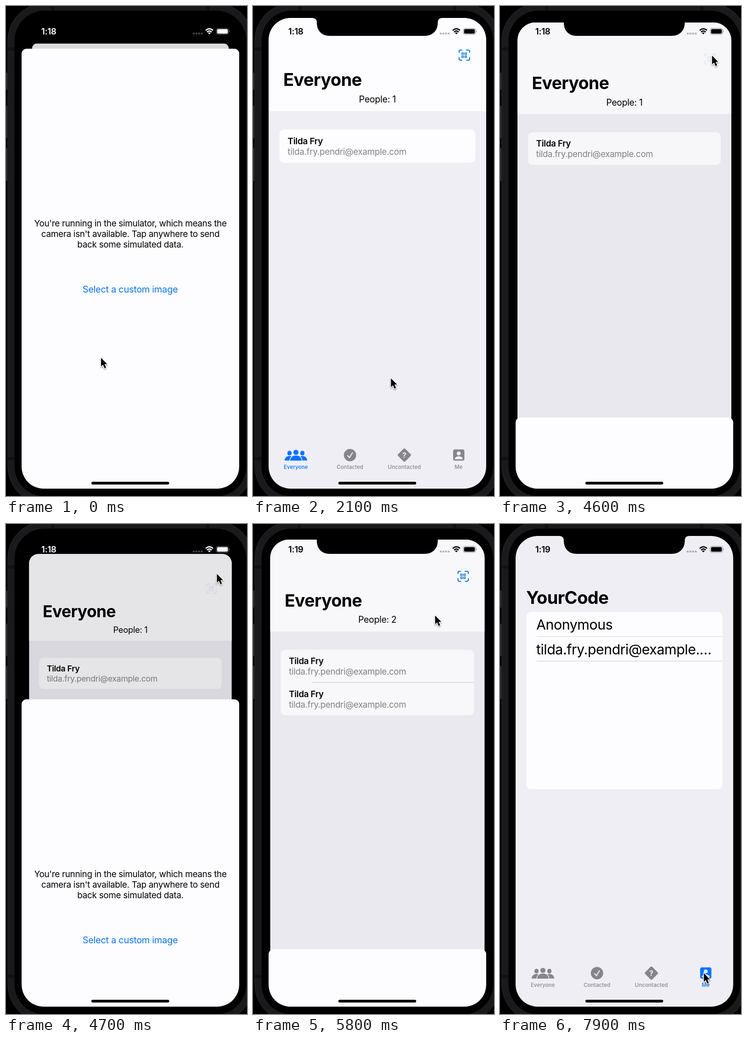
Write an HTML page that moves like this. It is 525 by 1067 pixels and loops after 8 s.

```html
<!DOCTYPE html>
<html lang="en">
<head>
<meta charset="utf-8">
<title>Contact scanner</title>
<style>
  html, body { margin: 0; width: 100%; height: 100%; overflow: hidden; background: #000; }
  svg { display: block; width: 525px; height: 1067px; }
  text { font-family: Inter, "Liberation Sans", sans-serif; font-size: 18.9px; letter-spacing: -.016em; }
  .mid { text-anchor: middle; }
  .title { font-size: 38px; font-weight: 700; }
  .name { font-weight: 600; }
  .mail { fill: #838287; }
  .big { font-size: 30.4px; }
  .white { fill: #fdfcfe; }
  .line { stroke: #d0cfd4; stroke-width: 1.2; }
  .tab { fill: #86858a; }
  .tab.on { fill: #0073ff; }
  .tab text { font-size: 11.5px; font-weight: 500; letter-spacing: .01em; text-anchor: middle; }
  .tab .cut { fill: #efeef5; }
</style>
</head>
<body>
<svg viewBox="0 0 525 1067">
  <defs>
    <clipPath id="screen"><rect x="34" y="26" width="474" height="1025" rx="48"/></clipPath>
    <clipPath id="pageClip"><rect id="pageRect" x="34" y="26" width="474" height="1042"/></clipPath>
    <g id="person"><circle r="5.6" cy="-6"/><path d="M-12.5 12C-12.5-3 12.5-3 12.5 12Z"/></g>
  </defs>

  <!-- phone body -->
  <rect width="525" height="1067"/>
  <g fill="#29282b">
    <rect x="-2" y="145" width="5" height="37"/>
    <rect x="-2" y="217" width="5" height="71"/>
    <rect x="-2" y="309" width="5" height="72"/>
  </g>
  <rect x="4" y="-6" width="534" height="1090" rx="82" fill="#1a191c" stroke="#242326" stroke-width="1.5"/>
  <g fill="#111013">
    <rect x="4" y="90" width="15" height="7"/><rect x="4" y="982" width="15" height="7"/>
    <rect x="98" y="-5" width="7" height="16"/><rect x="436" y="-5" width="7" height="16"/>
  </g>
  <rect x="18.5" y="10" width="505" height="1058" rx="66"/>

  <g clip-path="url(#screen)">
    <g id="page">
      <g clip-path="url(#pageClip)">
        <rect x="34" y="26" width="474" height="1042" fill="#efeef5"/>

        <g id="everyone">
          <rect class="white" x="34" y="26" width="474" height="203"/>
          <g id="scan" fill="none" stroke="#0b78e6" stroke-width="2.1" stroke-linecap="round">
            <path d="M449 101v-2q0-3 3-3h3M465 96h4q3 0 3 3v2M472 112v3q0 3-3 3h-4M455 118h-3q-3 0-3-3v-3"/>
            <path stroke-width="1.5" d="M455 102h3.6v3.6h-3.6zM461.6 102h3.6v3.6h-3.6zM455 108.6h3.6v3.6h-3.6zM461.6 108.6h3.6v3.6h-3.6z"/>
          </g>
          <text class="title" x="66" y="174">Everyone</text>
          <text class="mid" id="count" x="271" y="210" style="font-size:19.7px"></text>
          <rect class="white" id="card" x="57.5" y="269" width="427" rx="10"/>
          <g id="row">
            <text class="name" x="75.5" y="301">Tilda Fry</text>
            <text class="mail" x="75.5" y="324">tilda.fry.pendri@example.com</text>
          </g>
          <g id="second">
            <path class="line" d="M126 341.5H484"/>
            <use href="#row" y="73"/>
          </g>
        </g>

        <g id="me">
          <text class="title" x="57" y="174">YourCode</text>
          <rect class="white" x="57.5" y="191.5" width="427" height="386" rx="10"/>
          <path class="line" d="M80 245H484M80 298.7H484"/>
          <text class="big" x="79" y="230">Anonymous</text>
          <text class="big" x="79" y="284">tilda.fry.pendri@example.…</text>
        </g>

        <g class="tab" id="tabEveryone">
          <use href="#person" transform="translate(79.5 979) scale(.84 .9)"/>
          <use href="#person" transform="translate(107.5 979) scale(.84 .9)"/>
          <use href="#person" transform="translate(93.5 978)" stroke="#efeef5" stroke-width="3" paint-order="stroke"/>
          <rect class="cut" x="66" y="990" width="56" height="3"/>
          <text x="93.3" y="1008">Everyone</text>
        </g>
        <g class="tab">
          <circle cx="211.3" cy="978" r="13.4"/>
          <path d="M206 979l4 4.6 6.6-10.6" fill="none" stroke="#efeef5" stroke-width="2.2" stroke-linecap="round" stroke-linejoin="round"/>
          <text x="211.3" y="1008">Contacted</text>
        </g>
        <g class="tab">
          <rect x="-11" y="-11" width="22" height="22" rx="3" transform="translate(329.8 978) rotate(45)"/>
          <text class="cut" x="329.8" y="984" style="font-size:16.5px;font-weight:700">?</text>
          <text x="329.8" y="1008">Uncontacted</text>
        </g>
        <g class="tab" id="tabMe">
          <rect x="436" y="965.5" width="24.5" height="24.5" rx="4"/>
          <g class="cut"><circle cx="448.2" cy="974.3" r="4.3"/><path d="M439.5 987C440 978.5 456.5 978.5 457 987Z"/></g>
          <text x="448" y="1008">Me</text>
        </g>

        <rect id="dim" x="34" y="26" width="474" height="1042"/>
      </g>
    </g>

    <g id="sheet">
      <rect class="white" x="34" y="93" width="474" height="1040" rx="11"/>
      <g class="mid">
        <text x="271" y="480">You're running in the simulator, which means the</text>
        <text x="271" y="503.2">camera isn't available. Tap anywhere to send</text>
        <text x="271" y="526.4">back some simulated data.</text>
        <text x="270.5" y="624" fill="#0b74e4" style="font-size:20px">Select a custom image</text>
      </g>
    </g>
  </g>

  <!-- notch -->
  <path d="M129 20V26Q139 26 139 36C139 54 150 65 167 65H374C391 65 402.5 54 402.5 36Q402.5 26 412 26V20Z"/>

  <g id="status">
    <text class="mid" id="clock" x="93.2" y="62" style="font-size:18.9px;font-weight:600"></text>
    <path opacity=".27" d="M407 58h4v4h-4zM412.8 58h4v4h-4zM418.6 58h4v4h-4zM424.4 58h4v4h-4z"/>
    <path d="M435 53.2Q443 46 451 53.2M438 56.7Q443 52.2 448 56.7" fill="none" stroke="currentColor" stroke-width="2.7"/>
    <path d="M443 61.8l-3-3.1q3-2.4 6 0z"/>
    <rect x="458" y="48.5" width="27" height="13.5" rx="4" fill="none" stroke="currentColor" stroke-opacity=".4" stroke-width="1.2"/>
    <rect x="459.8" y="50.3" width="23.4" height="9.9" rx="2.5"/>
    <path opacity=".45" d="M486.3 53q2.2 2.2 0 4.5z"/>
  </g>

  <!-- home indicator -->
  <rect x="186" y="1036" width="169.5" height="6" rx="3"/>

  <path id="cursor" d="M0 0V19L4.3 15 7.7 22.7 11 21.2 7.7 13.7H13.4Z" stroke="#fff" stroke-width="2.6"
    stroke-linejoin="round" paint-order="stroke" style="filter:drop-shadow(0 2px 1.5px rgba(0,0,0,.35))"/>
</svg>
<script>
const $ = id => document.getElementById(id);
const LOOP = 8000;

// pointer stops: time, x, y
const stops = [
  [0, 207, 766], [200, 170, 715], [550, 330, 380], [900, 420, 166], [1400, 417.5, 142], [1700, 417.5, 142],
  [2300, 260, 1042], [2700, 110, 984], [3200, 452, 102], [3500, 329, 635], [3800, 107, 978],
  [4200, 484, 500], [4500, 462, 108], [4650, 462, 108], [5050, 405, 120], [5700, 405, 120],
  [6250, 312, 1012], [6350, 312, 1012], [6600, 330, 1029], [7050, 444, 978], [LOOP, 444, 978]
];

function pointer(t) {
  const i = stops.findIndex(s => s[0] > t);
  const [t0, x0, y0] = stops[i - 1], [t1, x1, y1] = stops[i];
  let k = (t - t0) / (t1 - t0);
  k = k * k * (3 - 2 * k);
  return `${x0 + (x1 - x0) * k} ${y0 + (y1 - y0) * k}`;
}

// critically damped spring from 0 to 1
function spring(t, start) {
  const w = Math.max(0, t - start) * .017;
  return 1 - (1 + w) * Math.exp(-w);
}

function sheetOpen(t) {
  if (t < 4000) return 1 - spring(t, 1537);
  return t < 5600 ? spring(t, 4556.5) : 1 - spring(t, 5600);
}

const show = (id, on) => $(id).style.display = on ? '' : 'none';

function draw(t) {
  const p = sheetOpen(t), scale = 1 - .0973 * p;
  const added = t >= 5600, onMe = t >= 7500;

  $('page').setAttribute('transform', `translate(271 ${26 + 55.7 * p}) scale(${scale}) translate(-271 -26)`);
  $('pageRect').setAttribute('rx', 46 - 34 * p);
  $('dim').setAttribute('opacity', .135 * p);
  $('sheet').setAttribute('transform', `translate(0 ${974 * (1 - p)})`);

  const tone = Math.round(255 * Math.min(1, Math.max(0, (p - .3) / .3)));
  const ink = `rgb(${tone},${tone},${tone})`;
  $('status').style.color = $('status').style.fill = ink;
  $('clock').textContent = added ? '1:19' : '1:18';

  $('count').textContent = added ? 'People: 2' : 'People: 1';
  $('card').setAttribute('height', added ? 145 : 72.5);
  $('scan').setAttribute('opacity', t >= 4500 && t < 5600 ? .1 : 1);
  show('second', added);
  show('everyone', !onMe);
  show('me', onMe);
  $('tabEveryone').classList.toggle('on', !onMe);
  $('tabMe').classList.toggle('on', onMe);
  $('cursor').setAttribute('transform', `translate(${pointer(t)})`);
}

const begin = performance.now();
function tick() {
  draw((performance.now() - begin) % LOOP);
  requestAnimationFrame(tick);
}
tick();
</script>
</body>
</html>
```
